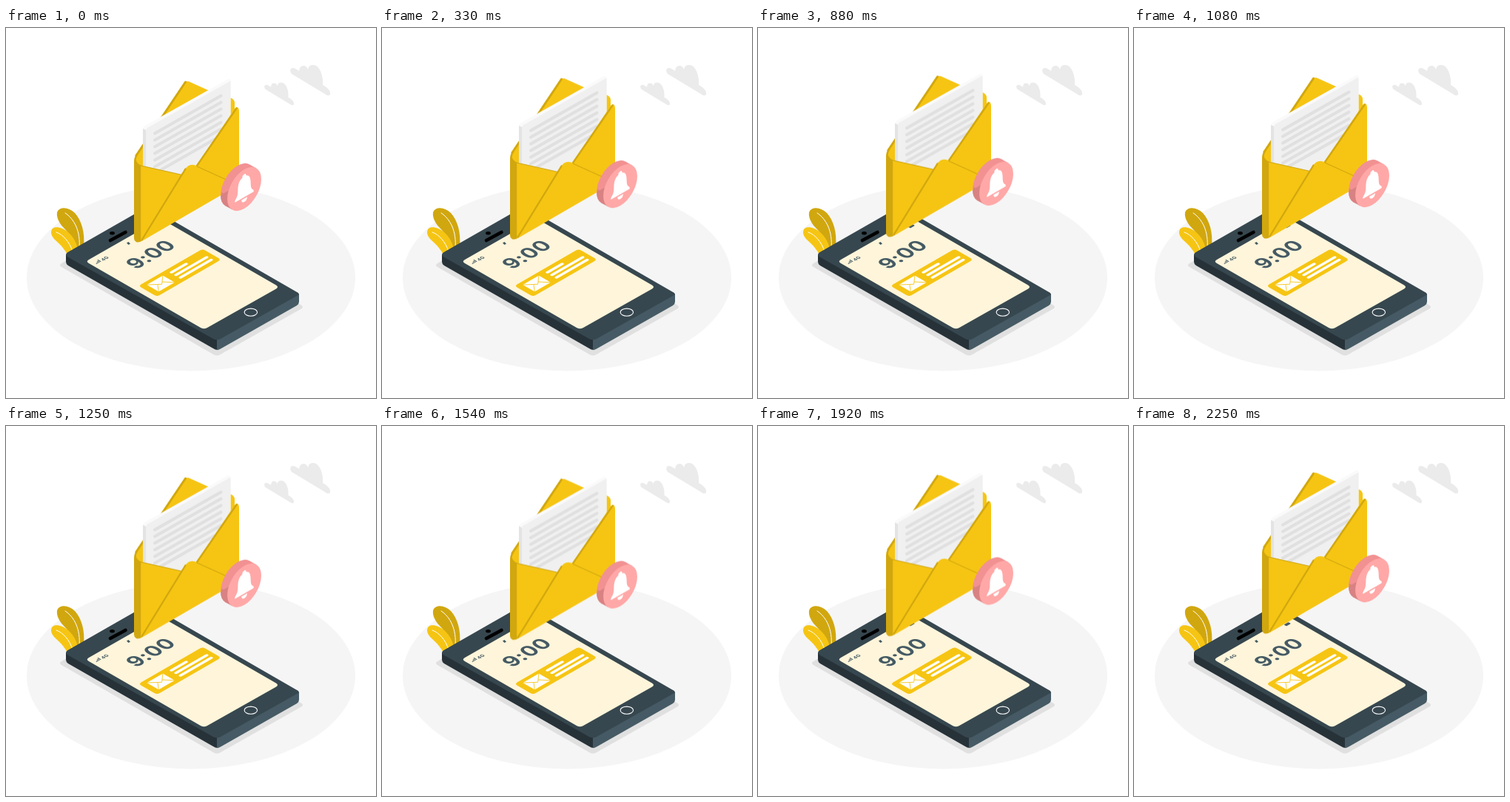
Write an HTML page that moves like this. It is 500 by 500 pixels and loops after 2.29 s.

```html
<!DOCTYPE html>
<html lang="en">
<head>
<meta charset="utf-8">
<title>Message notification</title>
<style>
  html, body { margin: 0; width: 100%; height: 100%; overflow: hidden; background: #fff; }
  svg { display: block; width: 100%; height: 100%; }
  .main { fill: #f6c513; }
  .dark { fill: #d1a70f; }
  .edge { fill: none; stroke: #d1a70f; stroke-width: 2.3; stroke-linecap: round; stroke-linejoin: round; }
  .thin { stroke-width: 1.1; }
  .vein { fill: none; stroke: #fff; stroke-width: 1; stroke-linecap: round; }
  .ink { fill: #455a64; }
  text { font-family: Inter, sans-serif; font-weight: 700; }

  /* 24 poses a second; one rise or fall of 10px takes 18 of them */
  .float { animation: float 2290ms infinite; }
  @keyframes float {
    0%      { transform: translateY(0);       animation-timing-function: steps(17); }
    30.909% { transform: translateY(-9.44px); animation-timing-function: steps(18); }
    63.636% { transform: translateY(.56px);   animation-timing-function: steps(18); }
    96.364% { transform: translateY(-9.44px); animation-timing-function: steps(2); }
    100%    { transform: translateY(-8.33px); }
  }
</style>
</head>
<body>
<svg viewBox="0 0 500 500">
  <defs>
    <path id="cloud" fill="#ebebeb" d="M386 62Q383 58 385 55Q388 52 396 58Q397 51 402 51Q406 51 408 56Q409 49 416 50C423 51 429 62 428 77Q437 82 438 87Q439 92 434 91Z"/>
  </defs>

  <ellipse cx="250" cy="337.4" rx="222" ry="126" fill="#f5f5f5"/>
  <use href="#cloud"/>
  <use href="#cloud" transform="translate(64.8 36.8) scale(.74)"/>

  <g id="plant">
    <path class="dark" d="M95 302C94 290 88 280 78 270C70 262 67 252 70 247C74 241 85 242 93 250C102 260 107 276 105 296Z"/>
    <path class="vein" d="M80 250C92 258 101 274 99 298"/>
    <path class="main" d="M84 308C80 300 75 294 66 286C60 280 60 274 63 271C67 267 77 270 84 276C92 283 97 293 98 304Z"/>
    <path class="vein" d="M68 276C77 279 86 289 90 302"/>
  </g>

  <g id="phone">
    <path fill="#e0e0e0" d="M75 318L90 309L385 367L399 374.5Q403 377 399 379.5L290 441Q285 444 280 441L75 323Q71 320.5 75 318Z"/>
    <path fill="#263238" d="M81 306V316Q81 319 84 321L280 433Q283 435 285.5 435V419Z"/>
    <path fill="#455a64" d="M285 419V435.3Q287 435.3 290 433.5L393 375Q396 373 396 370V359Z"/>
    <path fill="#37474f" d="M83.5 303L188 243.2Q192 241 196 243.2L392 356.2Q399 359.5 393 362L290 420Q285 422.5 280 420L83.5 309.5Q78.5 306 83.5 303Z"/>
    <path fill="#fef5da" d="M112 313L204 260.5Q209 258 214 260.5L365 347.5Q369 350 365 352.5L272 405Q267.5 407.5 263 405L112 318Q107.5 315.5 112 313Z"/>
    <path d="M141 287L161.5 276" stroke="#000" stroke-width="4.6" stroke-linecap="round"/>
    <ellipse cx="143.5" cy="277.3" rx="3.4" ry="2.2"/>
    <ellipse cx="330.8" cy="384.2" rx="8.7" ry="5.1" fill="none" stroke="#fff" stroke-width="1.1"/>

    <path class="ink" d="M163 290.5L165.5 289L168 291.5L165.5 293Z"/>
    <g transform="translate(122.5 319) matrix(.866 -.5 .866 .5 0 0)">
      <path d="M.5 0V-1.2M2.5 0V-2.4M4.5 0V-3.6M6.5 0V-4.8" stroke="#455a64" stroke-width="1.3"/>
    </g>
    <g transform="translate(131.5 315) matrix(.866 -.5 .866 .5 0 0)">
      <text class="ink" font-size="6.5">4G</text>
    </g>
    <g transform="translate(202.5 268.5) matrix(.866 -.5 .866 .5 0 0)">
      <rect class="ink" width="7" height="4" rx="1"/>
    </g>
    <g transform="translate(175.9 326.8) matrix(.866 -.5 .866 .5 0 0)">
      <text class="ink" font-size="27" letter-spacing=".3">9:00</text>
    </g>

    <g transform="translate(179 348.5) matrix(.866 -.5 .866 .5 0 0)">
      <rect class="main" width="100" height="29" rx="4"/>
      <rect x="8" y="5" width="25" height="18.5" rx="1" fill="#fff"/>
      <path d="M8 5L20.5 16L33 5M8 23.5L17 13M33 23.5L24 13" fill="none" stroke="#f6c513" stroke-width=".8"/>
      <path d="M44 7.5H67M44 14.5H92M44 21.5H92" stroke="#fff" stroke-width="3.8" stroke-linecap="round"/>
    </g>
  </g>

  <g class="float">
    <g id="back">
      <path class="main" d="M241 74Q243 71 247 72.3L273 84L304 94.5Q309 97 309 101V190L182 280L175 174Z"/>
      <path class="edge" style="stroke-width:3" d="M242.5 73L175.8 172.5"/>
    </g>

    <g id="letter">
      <path fill="#fafafa" d="M185 136.5Q185 134 187 132.5L299 69.5Q303 68 303.5 72V142L250 210L185 190Z"/>
      <path fill="#e3e3e3" d="M185 136L189.5 138V192L185 190Z"/>
      <path fill="#f0f0f0" d="M189.5 138Q189.5 136 191 135L303.5 71.5V142L250 210L189.5 192Z"/>
      <g stroke="#e0e0e0" stroke-width="4" stroke-linecap="round">
        <path id="row" d="M201 142.5L290.5 91.5"/>
        <use href="#row" y="9"/>
        <use href="#row" y="18"/>
        <use href="#row" y="27"/>
        <use href="#row" y="36"/>
        <use href="#row" y="45"/>
        <use href="#row" y="54"/>
      </g>
    </g>

    <g id="front">
      <path class="main" d="M181 185.5L240 199L257 187L309 109Q312 105.5 314 108Q315 110 315 114V208Q315 211.5 312 213.5L186 286.5L181 289Z"/>
      <path class="dark" d="M173 181Q173 175 176 171L178 172Q174 178 177.5 182Q179.5 184.5 182.2 185.5V288.5Q178 290.5 175.5 288.7Q173 287 173 284Z"/>
      <path class="edge" d="M257 187.5L311.5 108.5"/>
      <path class="edge thin" d="M182 186L238 198.5"/>
      <path class="main" d="M183 288L242 191Q248 181.5 258 186.5L312 211.5Z"/>
      <path class="edge" d="M183.5 286.5L242.5 190.5"/>
      <path class="edge thin" d="M258 187L312 211.5"/>
    </g>

    <g id="badge">
      <g transform="matrix(.866 -.5 0 1 313 212.5)">
        <circle r="26.5" fill="#f29192"/>
        <path d="M-26.5 0A26.5 26.5 0 0 0 -18.7 18.7L0 0Z" fill="#d88283"/>
      </g>
      <path fill="#f29192" d="M338.2 189.4L329.2 184.4L313 212.5L322 217.5Z"/>
      <path fill="#d88283" d="M290.5 222L300 226L305.8 245.6L296.8 240.6Z"/>
      <g transform="matrix(.866 -.5 0 1 322 217.5)">
        <circle r="26.5" fill="#ffa8a7"/>
        <path fill="#fff" d="M-14.5 11Q-15.5 8.5 -12.5 6.5Q-10 4 -10 -3C-10 -12 -7 -15.5 -3 -16.5Q-3 -20 0 -20Q3 -20 3 -16.5C7 -15.5 10 -12 10 -3Q10 4 12.5 6.5Q15.5 8.5 14.5 11ZM-4.5 13H4.5A4.5 4.5 0 0 1 -4.5 13Z"/>
      </g>
    </g>
  </g>
</svg>
</body>
</html>
```
